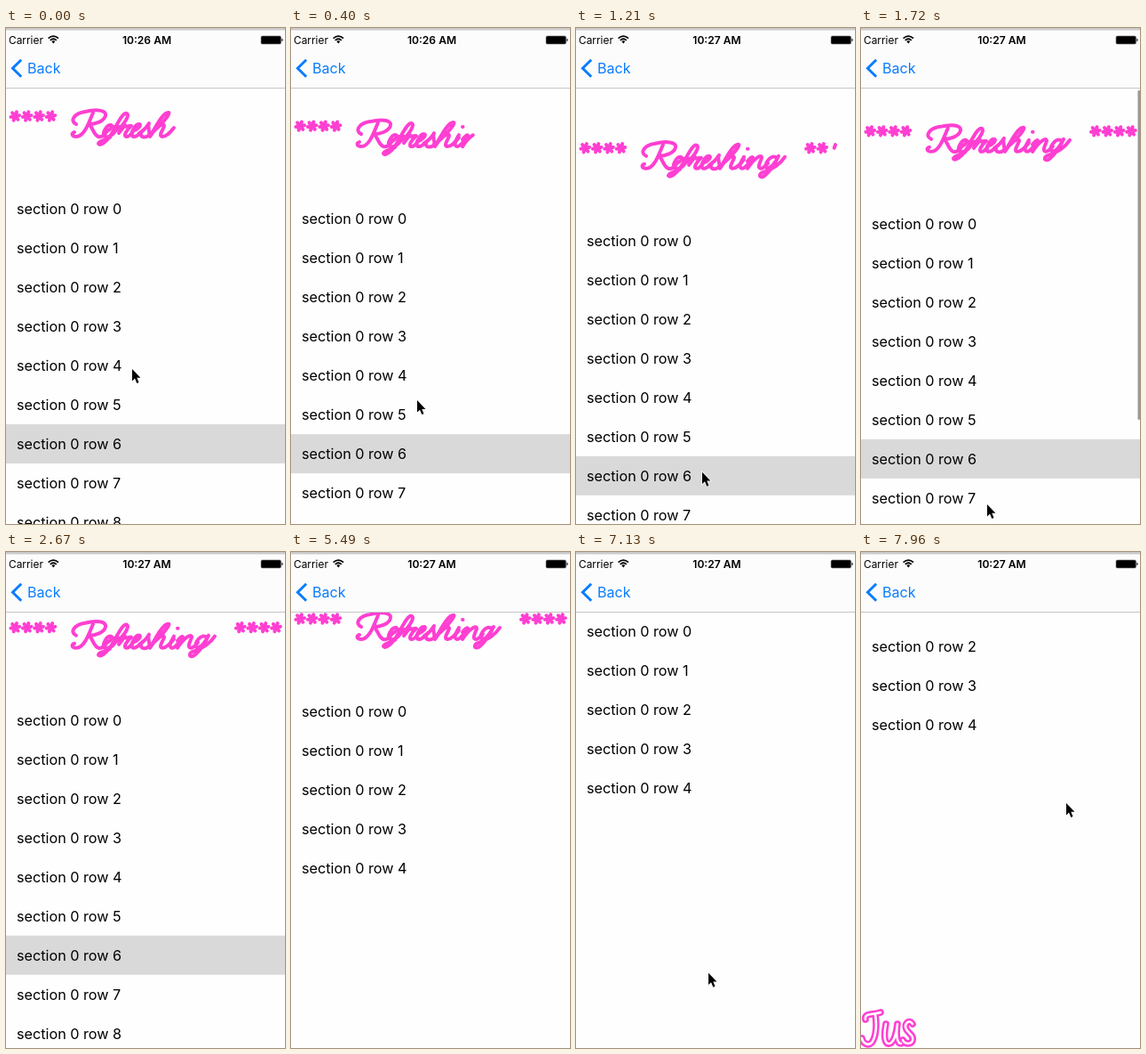
Recreate the animation shown at these times as an HTML page. Size 314 by 557 pixels, loop 8000 ms.

```html
<!DOCTYPE html>
<html lang="en">
<head>
<meta charset="utf-8">
<title>Pull to refresh</title>
<style>
  html, body { margin: 0; width: 100%; height: 100%; overflow: hidden; background: #fefefe; }
  svg { display: block; width: 314px; height: 557px; font-family: Inter, Roboto, sans-serif; }
  .ink { fill: none; stroke: #ff3fd2; stroke-linecap: round; stroke-linejoin: round; }
</style>
</head>
<body>
<svg viewBox="0 0 314 557">
  <defs><clipPath id="view"><rect y="68" width="314" height="489"/></clipPath></defs>
  <rect width="314" height="557" fill="#fefefe"/>
  <g clip-path="url(#view)">
    <g id="list">
      <g id="header" class="ink"></g>
      <g id="rows" font-size="16.2"></g>
    </g>
    <g id="footer" class="ink"></g>
    <rect id="bar" x="311.5" y="70" width="2.5" height="370" rx="1.2" fill="#999"/>
  </g>
  <rect width="314" height="67" fill="#fcfcfc"/>
  <rect width="314" height="2.5" fill="#cacaca"/>
  <rect y="67" width="314" height="1" fill="#c6c6c6"/>
  <text x="3" y="17.5" font-size="11.9">Carrier</text>
  <g fill="none" stroke="#000" stroke-width="1.8">
    <path d="M47.6 11.6Q53.3 6.6 59 11.6M49.8 13.8Q53.3 10.6 56.8 13.8"/>
    <path d="M51.3 15L53.3 17.6L55.3 15Q53.3 13.6 51.3 15Z" fill="#000" stroke="none"/>
  </g>
  <text id="clock" x="158.5" y="17.5" font-size="12.1" font-weight="600" text-anchor="middle"></text>
  <rect x="287" y="9" width="22.5" height="9" rx="1.5" fill="#000" stroke="#777" stroke-width=".6"/>
  <path d="M310.4 11.6Q313 13.5 310.4 15.4Z"/>
  <path d="M17.2 35.8L7.5 45.3L17.2 54.8" fill="none" stroke="#0a7cff" stroke-width="3"/>
  <text x="24" y="51" font-size="16.1" fill="#0a7cff">Back</text>
  <path id="cursor" d="M0 0V13.4L3 10.6L5.3 16L7.5 15.1L5.3 9.8H9.4Z" stroke="#fff" stroke-width="1.4" paint-order="stroke"/>
</svg>
<script>
const LOOP = 8000, REST = 89, ROW = 44, HEADER_BASE = 203;
const $ = id => document.getElementById(id);
const NS = 'http://www.w3.org/2000/svg';

function add(parent, tag, attrs, text) {
  const node = document.createElementNS(NS, tag);
  for (const key in attrs) node.setAttribute(key, attrs[key]);
  if (text) node.textContent = text;
  return parent.appendChild(node);
}

const clamp = (v, lo = 0, hi = 1) => Math.min(hi, Math.max(lo, v));
const linear = u => u;
const smooth = u => u * u * (3 - 2 * u);
const settle = u => 1 - (1 - u) ** 3;

// Each key is [time, value(s), easing from the previous key].
function track(keys, t) {
  let i = keys.findIndex(key => key[0] > t);
  if (i < 0) return keys[keys.length - 1][1];
  if (i === 0) return keys[0][1];
  const [t0, a] = keys[i - 1], [t1, b, ease = linear] = keys[i];
  const u = ease((t - t0) / (t1 - t0));
  return Array.isArray(a) ? a.map((v, k) => v + (b[k] - v) * u) : a + (b - a) * u;
}

// One continuous line, so that a partial dash draws petal after petal.
function asterisk(cx, cy) {
  let d = `M${cx} ${cy}`;
  for (let i = 0; i < 6; i++) {
    const a = (-70 + i * 60) * Math.PI / 180;
    d += `l${(4.9 * Math.cos(a)).toFixed(2)} ${(4.9 * Math.sin(a)).toFixed(2)}L${cx} ${cy}`;
  }
  return d;
}
const stars = x => [0, 1, 2, 3].map(i => asterisk(x + i * 13.4, 99));

const refreshing = [
  'M79 108C71 104 77 96 89 94C101 91 113 92 112 98C111 105 100 108 93 108C98 111 98 120 104 122C108 123 111 120 113 117M98 95C93 107 88 122 79 122C74 122 73 118 77 117',
  'M110 117C117 116 121 110 118 109C113 108 106 122 112 122C117 123 121 119 123 116',
  'M122 116C131 112 140 98 136 96C131 94 124 111 118 120C113 128 106 133 104 130C104 127 113 125 117 123M119 111L129 111',
  'M127 118L134 109C134 113 138 109 141 110C136 114 131 122 136 122C139 122 141 119 143 116',
  'M142 116C148 115 153 109 150 108C145 107 138 122 144 122C148 122 151 118 154 115',
  'M150 118C156 115 159 110 161 107C158 112 164 118 160 121C156 124 151 122 152 119',
  'M162 119C171 113 186 96 183 95C177 94 169 110 162 122C168 112 178 105 178 110C177 114 171 121 176 122C181 122 185 117 189 112',
  'M189 109C186 114 182 121 187 122C190 122 193 118 196 114M193 100L193.5 100',
  'M193 114C196 110 199 108 199 110C199 112 195 118 193 122C200 111 209 105 209 110C208 114 203 121 208 122C211 122 213 119 216 116',
  'M226 110C220 105 212 116 214 121C219 124 225 114 228 108C224 117 217 127 211 131C206 133 205 128 211 126C220 123 229 118 235 109'
];
const jus = [
  'M5 525C3 517 15 520 22 517M16 519C18 531 17 545 12 551C8 555 2 552 1 546',
  'M28 530C25 545 27 553 32 552C37 551 40 540 41 530C39 544 41 552 45 552',
  'M58 530C54 524 48 530 51 536C54 541 60 543 58 549C56 553 49 553 47 548'
];

const draw = (parent, paths, style) =>
  paths.map(d => add(parent, 'path', { d, pathLength: 1, ...style }));
const headerInk = draw($('header'),
  [...stars(10.3), ...refreshing, ...stars(263.8)], { 'stroke-width': 4 });
const footerInk = draw($('footer'), jus, { 'stroke-width': 7.6 });
const footerCore = draw($('footer'), jus, { 'stroke-width': 2.5, stroke: '#fff' });

function reveal(glyphs, count) {
  glyphs.forEach((glyph, i) => {
    const part = clamp(count - i);
    glyph.setAttribute('visibility', part > 0 ? 'visible' : 'hidden');
    glyph.setAttribute('stroke-dasharray', part < 1 ? `${part} 2` : 'none');
  });
}

const rows = Array.from({ length: 10 }, (_, i) => {
  const row = add($('rows'), 'g');
  const y = HEADER_BASE + i * ROW;
  if (i === 6) add(row, 'rect', { y: y - 22, width: 314, height: ROW, fill: '#d9d9d9' });
  add(row, 'text', { x: 12, y: y + 6 }, `section 0 row ${i}`);
  return row;
});

const scrollKeys = [
  [50, 203], [800, 226.7], [860, 228], [1550, 249, smooth], [1640, 249],
  [1720, 220], [2250, 188.7, settle], [5489, 188.7], [5490, 179],
  [5930, REST, smooth], [7510, REST], [7960, 17.5]
];
const pointerPaths = [
  [[50, [142, 383]], [800, [142, 458]], [860, [142, 461]], [1550, [142, 535]],
   [1740, [142, 535]], [2250, [183, 461], smooth], [2520, [183, 461]], [2670, [299, 478]]],
  [[6800, [55, 482]], [7130, [148, 474]], [7360, [231, 372], settle],
   [7510, [231, 372]], [7960, [231, 282]]]
];

function render(t) {
  const y = track(scrollKeys, t), pull = y - REST;
  $('list').setAttribute('transform', `translate(0 ${y - HEADER_BASE})`);
  reveal(headerInk, t < 1550 ? 11 + (pull - 114) * 3.4 / 24 : 18);

  $('footer').setAttribute('transform', `translate(0 ${71.5 + pull})`);
  const written = (-pull - 45) / 8.8;
  reveal(footerInk, written);
  reveal(footerCore, written);

  const rowCount = t < 5490 ? 10 : 5;
  rows.forEach((row, i) => row.setAttribute('display', i < rowCount ? 'inline' : 'none'));
  $('clock').textContent = t < 1200 ? '10:26 AM' : '10:27 AM';
  $('bar').setAttribute('opacity', t < 1670 ? 0 : clamp((2250 - t) / 250));

  const path = t < 2670 ? pointerPaths[0] : pointerPaths[1];
  const hidden = t >= 2670 && t < 6800;
  $('cursor').setAttribute('visibility', hidden ? 'hidden' : 'visible');
  $('cursor').setAttribute('transform', `translate(${track(path, t)})`);
}

const start = performance.now();
function tick() {
  render((performance.now() - start) % LOOP);
  requestAnimationFrame(tick);
}
tick();
</script>
</body>
</html>
```
